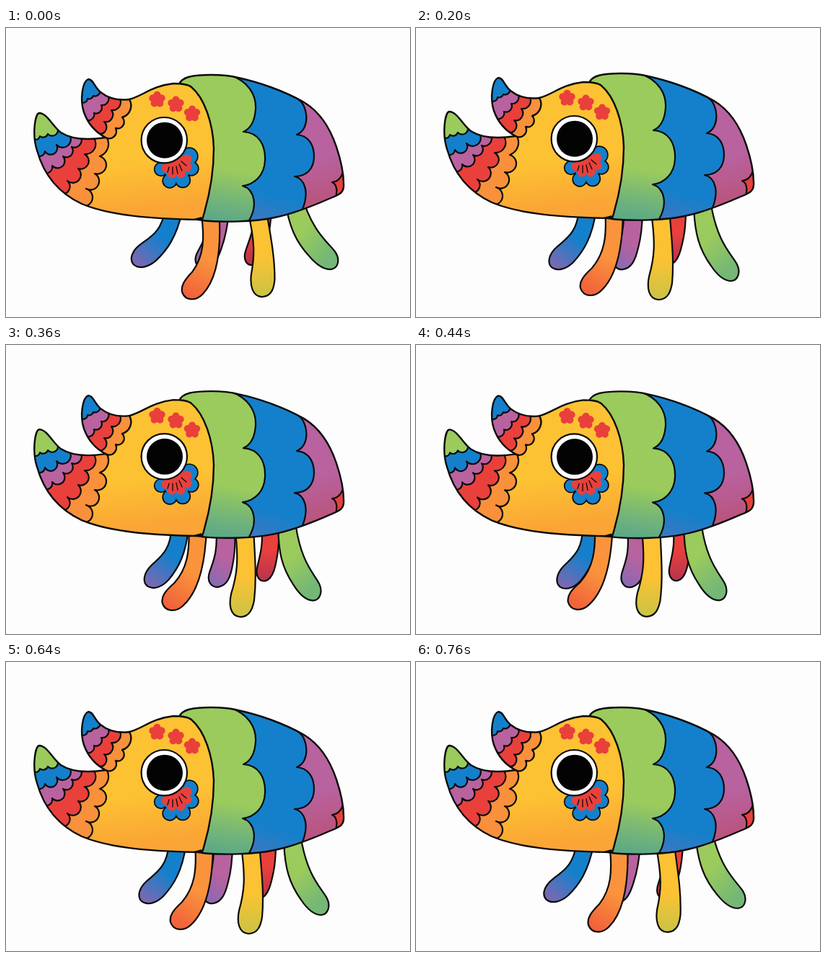
Animation, 560 px wide and 401 px high, one loop 800 ms. Source, as an HTML page:

```html
<!DOCTYPE html>
<html lang="en">
<head>
<meta charset="utf-8">
<title>Walking beetle</title>
<style>
html, body { margin: 0; width: 100%; height: 100%; overflow: hidden; background: #fdfdfd; }
svg { display: block; width: 560px; height: 401px; animation: walk .8s step-end infinite; }
.ink { fill: none; stroke: #0b0b0b; stroke-width: 2.4; stroke-linejoin: round; stroke-linecap: round; }
.bands path, .leg { stroke: #0b0b0b; stroke-width: 2.2; stroke-linejoin: round; }
.body { transform: translateY(calc(var(--bob) * 1px)); }

/* --q is the stride from -3 to 3; each leg follows it with a linear and a squared term */
.leg {
  --sq: calc(var(--q) * var(--q));
  transform-origin: var(--hip);
  transform:
    translate(calc((var(--q) * var(--x) + var(--sq) * var(--xx, 0)) * 1px),
              calc((var(--q) * var(--y, 0) + var(--sq) * var(--yy, 0)) * 1px))
    rotate(calc((var(--q) * var(--r) + var(--sq) * var(--rr, 0)) * 1deg));
}
.far-front { --hip: 236px 266px; --x: 2.1; --r: -1.5; }
.far-mid   { --hip: 300px 267px; --x: 2; --r: -1.7; }
.far-back  { --hip: 361px 266px; --x: 2.3; --y: -.5; --r: -1.2; }
.front { --hip: 276px 266px; --x: -4; --xx: -.3; --y: -1; --r: .95; --rr: -.15; }
.mid   { --hip: 341px 266px; --x: -3.9; --xx: -.2; --y: .67; --yy: -.22; --r: 1.15; --rr: -.17; }
.back  { --hip: 397px 257px; --x: -2.77; --xx: -.63; --y: 2.05; --yy: -.46; --r: 1.6; --rr: -.3; }

@keyframes walk {
  0%       { --q: -3; --bob: 2; }
  10%, 95% { --q: -2; --bob: 0; }
  20%, 85% { --q: -1; --bob: 0; }
  25%, 80% { --q: 0;  --bob: 0; }
  35%, 70% { --q: 1;  --bob: .7; }
  45%, 60% { --q: 2;  --bob: 1.1; }
  55%      { --q: 3;  --bob: 1.4; }
  100%     { --q: -3; --bob: 2; }
}
</style>
</head>
<body>
<svg viewBox="0 0 560 401">
  <defs>
    <linearGradient id="blueLeg" x1=".8" y1="0" x2=".2" y2="1">
      <stop offset=".45" stop-color="#1480cb"/><stop offset="1" stop-color="#7a68b2"/>
    </linearGradient>
    <linearGradient id="purpleLeg" x1=".7" y1="0" x2=".3" y2="1">
      <stop offset=".5" stop-color="#b8629f"/><stop offset="1" stop-color="#8a6ab2"/>
    </linearGradient>
    <linearGradient id="redLeg" x2="0" y2="1">
      <stop offset=".45" stop-color="#e9403c"/><stop offset="1" stop-color="#b5344f"/>
    </linearGradient>
    <linearGradient id="orangeLeg" x1=".6" y1="0" x2=".3" y2="1">
      <stop offset=".5" stop-color="#fa933c"/><stop offset="1" stop-color="#f1613a"/>
    </linearGradient>
    <linearGradient id="yellowLeg" x2="0" y2="1">
      <stop offset=".55" stop-color="#fdc233"/><stop offset=".95" stop-color="#cfc343"/>
    </linearGradient>
    <linearGradient id="greenLeg" x2=".5" y2="1">
      <stop offset=".5" stop-color="#9bcb5c"/><stop offset="1" stop-color="#74b776"/>
    </linearGradient>
    <linearGradient id="yellow" x2=".15" y2="1">
      <stop offset=".65" stop-color="#fdc233"/><stop offset="1" stop-color="#faa535"/>
    </linearGradient>
    <linearGradient id="green" x1=".6" y1="0" x2=".5" y2="1">
      <stop offset=".62" stop-color="#9bcb5c"/><stop offset=".8" stop-color="#74b578"/><stop offset="1" stop-color="#4fa28f"/>
    </linearGradient>
    <linearGradient id="blue" x1=".6" y1="0" x2=".45" y2="1">
      <stop offset=".78" stop-color="#1480cb"/><stop offset="1" stop-color="#4576bc"/>
    </linearGradient>
    <linearGradient id="purple" x2=".1" y2="1">
      <stop offset=".6" stop-color="#b8629f"/><stop offset=".85" stop-color="#b9557f"/>
    </linearGradient>

    <path id="shell" d="M240 76C244 66 258 63 284 63C300 63 311 64 322 67C350 73 385 85 413 101C436 115 450 139 458 163C465 184 468 200 468 214C469 226 463 229 450 234C425 245 398 256 372 261C345 267 300 268 272 265Z"/>
    <path id="head" d="M138 150C112 154 90 152 76 143C65 135 57 116 46 116C40 117 36 147 43 168C53 204 75 228 105 242C143 258 200 263 272 264C281 235 288 200 288 165C287 130 275 95 257 80C251 75 240 75 232 75C203 78 188 93 171 97"/>
    <path id="horn" d="M171 97C155 99 141 95 131 87C122 79 121 69 114 69C106 72 102 97 108 115C114 132 125 143 138 150A10 10 0 0 0 152 137A9 9 0 0 0 161 122A17 17 0 0 0 171 97Z"/>
    <clipPath id="inShell"><use href="#shell"/></clipPath>
    <clipPath id="inHead"><use href="#head"/></clipPath>
    <clipPath id="inHorn"><use href="#horn"/></clipPath>

    <g id="flower">
      <circle r="5"/>
      <circle cy="-6.4" r="5.1"/>
      <circle cy="-6.4" r="5.1" transform="rotate(72)"/>
      <circle cy="-6.4" r="5.1" transform="rotate(144)"/>
      <circle cy="-6.4" r="5.1" transform="rotate(216)"/>
      <circle cy="-6.4" r="5.1" transform="rotate(288)"/>
    </g>
    <g id="petals">
      <circle cx="215" cy="194" r="8.5"/>
      <circle cx="227" cy="210" r="9"/>
      <circle cx="245" cy="209" r="9.5"/>
      <circle cx="257" cy="193" r="9"/>
      <circle cx="254" cy="176" r="11"/>
      <circle cx="237" cy="192" r="18"/>
    </g>
  </defs>

  <path class="leg far-front" fill="url(#blueLeg)" d="M226 250C224 285 207 293 195 304C185 313 181 325 188 332C197 339 210 333 218 325C232 310 245 290 250 250Z"/>
  <path class="leg far-mid" fill="url(#purpleLeg)" d="M288 250C289 285 282 298 276 312C269 328 278 336 287 335C299 333 304 322 308 305C312 290 314 275 314 250Z"/>
  <path class="leg far-back" fill="url(#redLeg)" d="M350 250C352 280 346 292 342 308C338 322 345 329 352 328C364 326 368 305 371 290C374 275 374 260 374 250Z"/>
  <path class="leg back" fill="url(#greenLeg)" d="M385 239C385 287 394 309 409 330C417 342 427 351 437 351C447 350 450 338 445 328C438 314 417 299 408 239Z"/>
  <path class="leg front" fill="url(#orangeLeg)" d="M262 250C265 290 261 313 244 333C232 344 226 352 228 361C232 373 246 374 256 365C277 346 287 308 287 250Z"/>
  <path class="leg mid" fill="url(#yellowLeg)" d="M325 250C333 300 330 320 323 345C320 360 322 376 336 377C349 377 353 366 355 354C358 320 354 290 351 250Z"/>

  <g class="body">
    <g class="bands" clip-path="url(#inShell)">
      <rect x="230" y="55" width="245" height="220" fill="#e9403c"/>
      <path fill="url(#purple)" d="M468 194C466 205 460 211 452 212C459 215 460 225 456 236L400 280V50H480Z"/>
      <path fill="url(#blue)" d="M405 97C418 104 423 138 403 146C419 147 427 160 427 176C427 194 416 204 400 204C414 207 422 226 409 254L400 280H300V40H405Z"/>
      <path fill="url(#green)" d="M312 64C335 72 347 90 346 110C345 127 340 137 329 142C350 143 360 160 359 182C358 202 345 215 328 217C344 222 351 245 334 270V280H220V50H312Z"/>
    </g>
    <use href="#shell" class="ink"/>

    <use href="#head" fill="url(#yellow)"/>
    <g class="bands" clip-path="url(#inHead)">
      <path fill="#f9903b" d="M104 245A12 12 0 0 0 111 221A12 12 0 0 0 123 200A12 12 0 0 0 130 176A18 18 0 0 0 139 149L20 90V250Z"/>
      <path fill="#e9403c" d="M71 226A10 10 0 0 0 85 210A11 11 0 0 0 100 193A11 11 0 0 0 109 173A14 14 0 0 0 121 150L20 90V240Z"/>
      <path fill="#b8629f" d="M50 198A9 9 0 0 0 64 189A9 9 0 0 0 79 176A9 9 0 0 0 91 163A10 10 0 0 0 104 150L20 90V210Z"/>
      <path fill="#1480cb" d="M39 172A8 8 0 0 0 54 169A9 9 0 0 0 70 160A11 11 0 0 0 87 145L60 90H20V180Z"/>
      <path fill="#9bcb5c" d="M36 150A6 6 0 0 0 47 148A7 7 0 0 0 58 145A8 8 0 0 0 70 134L60 90H20Z"/>
    </g>
    <use href="#head" class="ink"/>
    <path fill="#0b0b0b" d="M256 264L271 260L273 266Z"/>

    <g class="bands" clip-path="url(#inHorn)">
      <use href="#horn" fill="#f9903b"/>
      <path fill="#e9403c" d="M123 143A9 9 0 0 0 136 128A10 10 0 0 0 146 112A11 11 0 0 0 154 92L140 50H90V130Z"/>
      <path fill="#b8629f" d="M108 123A8 8 0 0 0 122 116A8 8 0 0 0 132 105A9 9 0 0 0 140 90L130 50H90Z"/>
      <path fill="#1480cb" d="M102 99A6 6 0 0 0 113 96A6 6 0 0 0 121 92A7 7 0 0 0 130 83L125 50H90Z"/>
    </g>
    <use href="#horn" class="ink"/>

    <g fill="#e9403c">
      <use href="#flower" x="209.500" y="97.300"/>
      <use href="#flower" x="235.500" y="104"/>
      <use href="#flower" x="258" y="117"/>
    </g>

    <use href="#petals" fill="#0b0b0b" stroke="#0b0b0b" stroke-width="3.400"/>
    <use href="#petals" fill="#1480cb"/>
    <g fill="#e9403c">
      <circle cx="222" cy="192" r="6.500"/>
      <circle cx="230" cy="200" r="6.500"/>
      <circle cx="242" cy="200" r="6.500"/>
      <circle cx="251" cy="191" r="6.500"/>
      <circle cx="251" cy="180" r="6.500"/>
      <circle cx="237" cy="187" r="14"/>
    </g>
    <path class="ink" style="stroke-width:1.3" d="M226 191L224 198M231 191V201M236 190L238 200M240 187L244 196M243 183L250 189"/>

    <circle cx="219.300" cy="153.700" r="31.700" fill="#fff" stroke="#0b0b0b" stroke-width="2.200"/>
    <circle cx="220" cy="153.700" r="25" fill="#030303"/>
  </g>
</svg>
</body>
</html>
```
